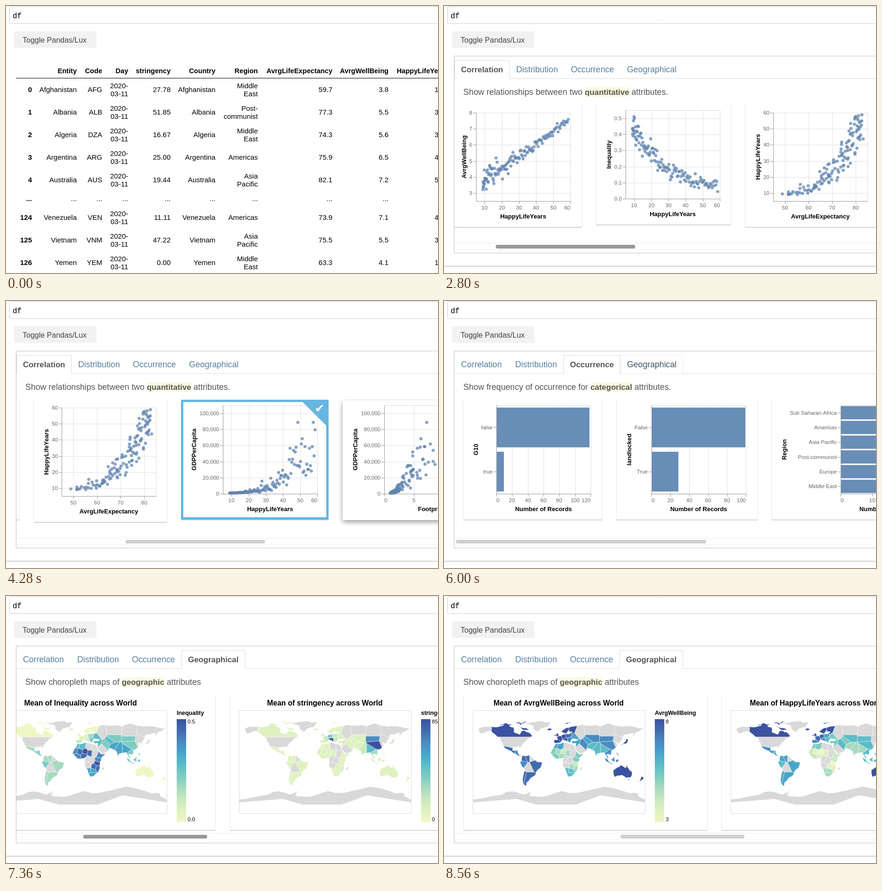
An HTML page with a canvas that plays this animation: 916 px wide and 568 px high, repeating every 8600 ms.

```html
<!DOCTYPE html>
<html>
<head>
<meta charset="utf-8">
<style>
html, body { margin: 0; width: 100%; height: 100%; overflow: hidden; background: #fff; }
canvas { display: block; }
</style>
</head>
<body>
<canvas id="stage" width="916" height="568"></canvas>
<script>
const ctx = document.getElementById('stage').getContext('2d');
const LOOP = 8600, VIEW = 1194, GAP = 31, PLOT_W = 200, PLOT_H = 188;
const SANS = '"Liberation Sans", Arial, sans-serif';
const MONO = '"Liberation Mono", monospace';
const BLUE = '#688db6', GRID = '#e2e2e2', AXIS = '#999';

// ---------- helpers ----------
const setFont = (size, bold, family = SANS) => { ctx.font = `${bold ? 'bold ' : ''}${size}px ${family}`; };
function measure(s, size, bold) {
  setFont(size, bold);
  return ctx.measureText(s).width;
}
function text(s, x, y, size, { align = 'left', bold = false, color = '#000', font = SANS } = {}) {
  setFont(size, bold, font);
  ctx.textAlign = align;
  ctx.fillStyle = color;
  ctx.fillText(s, x, y + size * 0.35);
}
function sideText(s, x, y, size) {
  ctx.save();
  ctx.translate(x, y);
  ctx.rotate(-Math.PI / 2);
  text(s, 0, 0, size, { align: 'center', bold: true });
  ctx.restore();
}
function rect(x, y, w, h, color) {
  ctx.fillStyle = color;
  ctx.fillRect(x, y, w, h);
}
function frame(x, y, w, h, color) {
  ctx.strokeStyle = color;
  ctx.lineWidth = 1;
  ctx.strokeRect(x + 0.5, y + 0.5, w, h);
}
const hline = (x, y, w, color) => rect(x, y, w, 1, color);
const vline = (x, y, h, color) => rect(x, y, 1, h, color);
const clamp = (v, lo, hi) => Math.min(hi, Math.max(lo, v));
const smooth = (t, a, b) => { const p = clamp((t - a) / (b - a), 0, 1); return p * p * (3 - 2 * p); };
const range = (a, b, step) => Array.from({ length: Math.round((b - a) / step) + 1 }, (_, i) => a + i * step);
const bell = (x, width) => Math.exp(-((x / width) ** 2));

let seed = 11;
function random() {
  seed = (seed * 1664525 + 1013904223) % 4294967296;
  return seed / 4294967296;
}
const noise = () => (random() + random() + random() - 1.5) * 2;

// ---------- scatter data ----------
const countries = range(0, 127, 1).map(i => {
  const happy = 9 + 50 * ((i + 0.5) / 128) ** 1.4;
  const decay = Math.exp(-(happy - 9) / 20);
  const gdp = Math.min(106000, 700 + Math.min(40000 * (happy / 50) ** 3.6, 50000) * Math.exp(noise() * 0.45));
  return {
    happy, gdp,
    life: clamp(84 - 30 * decay + noise() * (3 * decay + 1.5), 48.9, 83.6),
    being: 2.95 + 0.078 * happy + noise() * 0.42 * (1 - happy / 75),
    unequal: clamp(0.04 + 0.66 * Math.exp(-happy / 20) + noise() * (0.04 * decay + 0.015), 0.04, 0.51),
    foot: 0.6 + 0.68 * (gdp / 1000) ** 0.55 * Math.exp(noise() * 0.28)
  };
});

// ---------- charts ----------
const field = (title, domain, ticks, label = v => v.toLocaleString('en-US')) => ({ title, domain, ticks, label });
const fields = {
  life: field('AvrgLifeExpectancy', [45, 85], range(50, 80, 10)),
  being: field('AvrgWellBeing', [2.5, 8], range(3, 8, 1)),
  happy: field('HappyLifeYears', [5, 60], range(10, 60, 10)),
  unequal: field('Inequality', [0, 0.55], range(0, 0.5, 0.1), v => v.toFixed(1)),
  gdp: field('GDPPerCapita', [0, 110000], range(0, 100000, 20000)),
  foot: field('Footprint', [0, 16], range(0, 15, 5)),
  stringency: field('stringency', [0, 100], range(0, 100, 20))
};
const count = max => field('Number of Records', [0, max], range(0, max, max > 60 ? 20 : 10));
const scale = ([a, b], lo, hi) => v => lo + (v - a) / (b - a) * (hi - lo);
const LABEL = 11.5, labelColor = '#666';

function xAxis(f, left, top) {
  const X = scale(f.domain, left, left + PLOT_W), base = top + PLOT_H;
  for (const v of f.ticks) {
    const x = Math.round(X(v)), label = f.label(v), half = measure(label, LABEL) / 2;
    vline(x, top, PLOT_H, GRID);
    vline(x, base, 6, AXIS);
    text(label, clamp(x, left + half, left + PLOT_W - half), base + 14, LABEL, { align: 'center', color: labelColor });
  }
  text(f.title, left + PLOT_W / 2, base + 32, 13, { align: 'center', bold: true });
  return X;
}
function yTick(label, left, y) {
  hline(left - 6, Math.round(y), 6, AXIS);
  text(label, left - 8, y, LABEL, { align: 'right', color: labelColor });
}
// Places a plot in its card: the widest label sets the left margin.
function plotCard(xField, yTitle, labels, top, drawMarks) {
  const margin = 46 + Math.max(...labels.map(s => measure(s, LABEL)));
  return {
    width: Math.round(margin + PLOT_W + 23.5),
    bottom: top + 244,
    draw(x) {
      const left = Math.round(x + margin);
      const X = xAxis(xField, left, top);
      frame(left, top, PLOT_W, PLOT_H, '#ddd');
      sideText(yTitle, x + 26, top + PLOT_H / 2, 13);
      drawMarks(left, X);
      hline(left, top + PLOT_H, PLOT_W + 1, AXIS);
      vline(left, top, PLOT_H, AXIS);
    }
  };
}
function valueCard(xField, yField, drawMarks) {
  const top = yField.ticks.at(-1) === yField.domain[1] ? 227 : 222;
  const Y = scale(yField.domain, top + PLOT_H, top);
  return plotCard(xField, yField.title, yField.ticks.map(yField.label), top, (left, X) => {
    for (const v of yField.ticks) {
      hline(left, Math.round(Y(v)), PLOT_W, GRID);
      yTick(yField.label(v), left, Y(v));
    }
    drawMarks(left, X, Y);
  });
}
const scatter = (xKey, yKey) => valueCard(fields[xKey], fields[yKey], (left, X, Y) => {
  ctx.fillStyle = 'rgba(96,132,175,.75)';
  for (const c of countries) {
    ctx.beginPath();
    ctx.arc(X(c[xKey]), Y(c[yKey]), 3.3, 0, 7);
    ctx.fill();
  }
});
const histogram = (key, max, shape) => valueCard(fields[key], count(max), (left, X, Y) => {
  for (let i = 0; i < 10; i++) {
    const y = Y(max * shape((i + 0.5) / 10));
    rect(left + i * 20 + 1, y, 18, Y(0) - y, BLUE);
  }
});
function bars(title, max, names, value) {
  const band = PLOT_H / names.length;
  return plotCard(count(max), title, names, 222, (left, X) => names.forEach((name, i) => {
    const mid = 222 + band * (i + 0.5);
    rect(left, mid - band * 0.45, X(value(i)) - left, band * 0.9, BLUE);
    yTick(name, left, mid);
  }));
}

// ---------- maps ----------
const parse = s => s.split(',').map(p => p.trim().split(' ').map(Number));

// Roughens a coarse outline into a coast.
function coast(points, depth = 2) {
  if (!depth) return points;
  return coast(points.flatMap((p, i) => {
    const q = points[(i + 1) % points.length];
    const dx = q[0] - p[0], dy = q[1] - p[1], bend = noise() * 0.08;
    return [p, [(p[0] + q[0]) / 2 - dy * bend, (p[1] + q[1]) / 2 + dx * bend]];
  }), depth - 1);
}

// The part of the world nearer to one site than to any other.
function cell(site, sites) {
  const d2 = (p, s) => (p[0] - s[0]) ** 2 + (p[1] - s[1]) ** 2;
  let poly = [[-200, -95], [200, -95], [200, 95], [-200, 95]];
  for (const other of sites) {
    if (other === site) continue;
    const side = p => d2(p, site) - d2(p, other);
    poly = poly.flatMap((p, i) => {
      const q = poly[(i + 1) % poly.length], a = side(p), b = side(q), k = a / (a - b);
      const cut = a * b < 0 ? [[p[0] + k * (q[0] - p[0]), p[1] + k * (q[1] - p[1])]] : [];
      return a <= 0 ? [p, ...cut] : cut;
    });
  }
  return poly;
}
const toPath = rings => new Path2D(rings.map(ring => `M${ring.join(' ')}Z`).join(''));

// Outlines in degrees; sites are longitude, latitude, wealth (-1: no data).
const lands = [
  ['-168 66,-156 71,-128 70,-95 69,-94 59,-82 54,-77 62,-64 59,-56 52,-66 45,-75 36,-81 26,-84 30,-97 27,-97 20,-87 21,-83 10,-78 8,-95 15,-106 22,-117 32,-124 48,-140 60,-163 56;-90 80,-66 83,-80 75;-118 73,-102 72,-107 69;-86 73,-63 65,-74 64;-124 75,-98 76,-112 74',
    '-100 62 9,-100 36 -1,-104 18 6.5,-88 5 5,-182 64 -1'],
  ['-73 78,-35 83,-18 79,-24 70,-40 65,-44 60,-53 66,-57 75', '-40 70 -1'],
  ['-77 8,-62 10,-50 0,-35 -6,-39 -17,-48 -26,-58 -37,-66 -46,-69 -55,-75 -48,-71 -20,-81 -5',
    '-73 4 6,-66 7 6,-56 7 -1,-50 -10 6,-76 -9 5,-65 -17 -1,-74 -32 6,-65 -34 6'],
  ['-17 15,-6 35,10 37,32 31,43 12,51 12,40 -5,40 -16,33 -28,20 -35,12 -17,9 4,-8 4',
    '2 29 4,-8 31 4,-3 18 1,-11 20 2,10 17 0,18 15 1,18 27 -1,28 27 -1,29 14 -1,8 9 1,-8 8 2,40 9 2,37 0 2,22 -2 -1,13 4 -1,35 -7 0,17 -12 -1,27 -14 1,37 -16 1,17 -22 3,24 -23 3,24 -30 3'],
  ['-9 37,-9 43,-1 44,-4 48,8 54,22 55,29 60,22 61,24 66,13 56,5 60,15 68,27 71,68 73,104 78,140 72,180 69,163 60,157 51,155 59,136 54,127 35,121 39,122 30,109 20,109 11,100 13,104 2,94 17,80 14,78 8,72 21,57 26,59 21,45 13,35 29,36 36,27 37,29 41,41 42,30 46,23 37,13 45,17 39,8 44,-1 37',
    '-4 40 7,2 47 8,10 51 8,13 42 7,15 63 9,26 63 9,20 52 6,23 44 5,32 49 4,33 38 4,45 24 -1,54 33 5,62 40 4,67 29 3,78 21 3,96 21 3,102 13 5,104 34 5,125 43 -1,103 46 5,67 47 5,67 61 -1,42 57 -1,103 56 -1,132 58 -1'],
  ['-5 50,1 52,-3 58;-10 52,-6 55,-6 52;-24 65,-14 66,-19 63;12 79,26 80,17 77', '0 55 8.5'],
  ['130 32,136 36,141 45,145 43,140 35', '138 36 7'],
  ['95 5,106 -6,103 -1;106 -6,115 -8,108 -8;109 1,117 6,116 -4;119 1,125 1,121 -5;120 18,126 7,123 11', '115 0 5'],
  ['114 -22,130 -11,140 -17,142 -11,153 -25,150 -37,138 -35,130 -32,116 -35;173 -35,178 -38,168 -47;145 -41,148 -41,146 -43', '135 -25 9'],
  ['-180 -90,-180 -84,-120 -74,-75 -73,-58 -64,-62 -75,-35 -78,-10 -71,55 -66,135 -66,165 -71,167 -78,180 -84,180 -90;44 -17,50 -15,46 -25', '0 -80 -1']
].map(([outline, siteList]) => {
  const sites = parse(siteList);
  return {
    outline: toPath(outline.split(';').map(ring => coast(parse(ring)))),
    cells: sites.map(s => ({ lon: s[0], lat: s[1], wealth: s[2], path: toPath([cell(s, sites)]) }))
  };
});

const ramp = ['#eef7c4', '#dff1c1', '#c9e9bf', '#a6dbc0', '#7dccc2', '#5cbdc8', '#48a5ca', '#4a8bc1', '#436bb0', '#3b52a1'];
const near = (c, lon, lat, reach) => bell(Math.hypot(c.lon - lon, c.lat - lat), reach);
const shades = {
  GDPPerCapita: c => c.wealth ** 2 / 11,
  Inequality: c => 9.4 - c.wealth,
  stringency: c => 1 + 8 * Math.max(near(c, 105, 36, 20), near(c, 12, 43, 8)),
  AvrgWellBeing: c => c.wealth + 1.5,
  HappyLifeYears: c => c.wealth
};

function worldMap(title, max, min) {
  return {
    width: Math.round(429 + measure(title, 12.4, true)),
    bottom: 499,
    draw(x) {
      const left = x + 19, bar = left + 386;
      text(`Mean of ${title} across World`, left + 182, 228, 15.6, { align: 'center', bold: true });
      frame(left, 243, 365, 219, '#ddd');
      ctx.save();
      ctx.translate(left + 182.5, 349);
      ctx.scale(1.013, -1);
      ctx.strokeStyle = '#fff';
      ctx.lineWidth = 0.5;
      for (const { outline, cells } of lands) {
        ctx.save();
        ctx.clip(outline);
        for (const c of cells) {
          ctx.fillStyle = c.wealth < 0 ? '#d9d9d9' : ramp[Math.round(clamp(shades[title](c), 0, 9))];
          ctx.fill(c.path);
          ctx.stroke(c.path);
        }
        ctx.restore();
      }
      ctx.restore();
      const fill = ctx.createLinearGradient(0, 481, 0, 262);
      ramp.forEach((color, i) => fill.addColorStop(i / 9, color));
      text(title, bar, 249, 12.4, { bold: true });
      rect(bar, 262, 20, 219, fill);
      text(max, bar + 23, 267, LABEL);
      text(min, bar + 23, 475, LABEL);
    }
  };
}

// ---------- tabs ----------
const TAB = 17.7, TAB_BOLD = 16.75;
const tabs = [
  { name: 'Correlation', note: ['Show relationships between two ', 'quantitative', ' attributes.'], thumb: 296, cards: [
    scatter('life', 'unequal'), scatter('happy', 'being'), scatter('happy', 'unequal'),
    scatter('life', 'happy'), scatter('happy', 'gdp'), scatter('foot', 'gdp')] },
  { name: 'Distribution', note: ['Show univariate distributions of ', 'quantitative', ' attributes.'], thumb: 340, cards: [
    histogram('gdp', 80, u => 0.95 * Math.exp(-u * 5)),
    histogram('stringency', 40, u => 0.9 * bell(u - 0.2, 0.28)),
    histogram('unequal', 30, u => 0.9 * bell(u - 0.4, 0.4))] },
  { name: 'Occurrence', note: ['Show frequency of occurrence for ', 'categorical', ' attributes.'], thumb: 531, cards: [
    bars('G10', 120, ['false', 'true'], i => i ? 9.6 : 118.5),
    bars('landlocked', 100, ['False', 'True'], i => i ? 28.5 : 99.5),
    bars('Region', 30, ['Sub Saharan Africa', 'Americas', 'Asia Pacific', 'Post-communist', 'Europe', 'Middle East'], i => 28 - 2.5 * i)] },
  { name: 'Geographical', note: ['Show choropleth maps of ', 'geographic', ' attributes'], thumb: 263, cards: [
    worldMap('GDPPerCapita', '100,000', '0'), worldMap('Inequality', '0.5', '0.0'), worldMap('stringency', '85', '0'),
    worldMap('AvrgWellBeing', '8', '3'), worldMap('HappyLifeYears', '60', '9')] }
];
for (const { cards } of tabs) {
  let left = 41;
  for (const card of cards) {
    card.left = left;
    left += card.width + GAP;
  }
}

function drawCard({ left, width, bottom, draw }, scroll, hovered, selected) {
  const x = Math.round(left - scroll);
  if (x > 916 || x + width < 22) return;
  if (hovered) {
    ctx.save();
    ctx.shadowColor = 'rgba(0,0,0,.4)';
    ctx.shadowBlur = 10;
    ctx.shadowOffsetY = 4;
    rect(x, 211, width, bottom - 211, '#fff');
    ctx.restore();
  } else {
    vline(x - 1, 211, bottom - 211, '#e8e8e8');
    vline(x + width, 211, bottom - 211, '#e8e8e8');
    hline(x, bottom - 1, width, '#c8c8c8');
    hline(x, bottom, width, '#e4e4e4');
  }
  draw(x);
  if (!selected) return;
  const right = x + width - 4;
  ctx.strokeStyle = ctx.fillStyle = '#66b6e2';
  ctx.lineWidth = 5;
  ctx.strokeRect(x + 1.5, 212.5, width - 3, 250);
  ctx.beginPath();
  ctx.moveTo(right - 52, 213);
  ctx.lineTo(right, 213);
  ctx.lineTo(right, 265);
  ctx.fill();
  text('✔', right - 14, 228, 25, { align: 'center', color: '#fff', font: '"DejaVu Sans", sans-serif' });
}

function drawTabs(active, hover) {
  hline(22, 154, 894, '#ddd');
  let x = 36;
  tabs.forEach(({ name }, i) => {
    const on = i === active, size = on ? TAB_BOLD : TAB;
    const width = Math.round(measure(name, size, on));
    if (on) {
      rect(x - 13, 115, width + 26, 41, '#fff');
      ctx.strokeStyle = '#ddd';
      ctx.lineWidth = 1;
      ctx.beginPath();
      ctx.moveTo(x - 13.5, 155);
      ctx.lineTo(x - 13.5, 115.5);
      ctx.lineTo(x + width + 13.5, 115.5);
      ctx.lineTo(x + width + 13.5, 155);
      ctx.stroke();
    } else if (i === hover) {
      frame(x - 13, 115, width + 26, 39, '#eee');
    }
    text(name, x, 135, size, { bold: on, color: on ? '#555' : i === hover ? '#3d566b' : '#557f9f' });
    x += width + 28;
  });
}

function drawNote([before, key, after]) {
  const color = '#555';
  const keyX = 41 + measure(before, TAB), keyWidth = measure(key, TAB_BOLD, true);
  text(before, 41, 183, TAB, { color });
  rect(keyX, 173, keyWidth, 20, '#fbfbe0');
  text(key, keyX, 183, TAB_BOLD, { bold: true, color });
  text(after, keyX + keyWidth, 183, TAB, { color });
}

function drawLux(t) {
  const active = t < 4820 ? 0 : t < 5560 ? 1 : t < 6280 ? 2 : 3;
  const hover = active === 2 && t > 5880 ? 3 : -1;
  const scroll = active === 0 ? 921 * smooth(t, 2140, 3742) : active === 3 ? 1585 * smooth(t, 6800, 8102) : 0;
  const dragging = t > 2140 && t < 3820 || t > 6760 && t < 8280;
  const { note, thumb, cards } = tabs[active];

  frame(21, 106, 920, 419, '#c4c4c4');
  hline(0, 553, 916, '#aaa');
  drawTabs(active, hover);
  drawNote(note);

  ctx.save();
  ctx.beginPath();
  ctx.rect(22, 209, 894, 294);
  ctx.clip();
  cards.forEach((card, i) => {
    const picked = active === 0 && (i === 4 && t > 4000 || i === 5 && t > 4480);
    const hovered = active === 0 && i === 5 && t > 4200;
    drawCard(card, scroll, hovered, picked);
  });
  ctx.restore();

  hline(22, 504, 894, '#ececec');
  hline(22, 518, 894, '#f0f0f0');
  ctx.fillStyle = dragging ? '#999' : '#d0d0d0';
  ctx.beginPath();
  ctx.roundRect(25 + scroll * thumb / VIEW, 508, thumb, 8, 4);
  ctx.fill();
}

// ---------- table ----------
const columns = [['', 55], ['Entity', 150], ['Code', 204], ['Day', 259], ['stringency', 349], ['Country', 444],
  ['Region', 534], ['AvrgLifeExpectancy', 692], ['AvrgWellBeing', 811], ['HappyLifeYears', 938]];
const rows = [
  '0|Afghanistan|AFG|27.78|Middle/East|59.7|3.8|12.4',
  '1|Albania|ALB|51.85|Post-/communist|77.3|5.5|34.4',
  '2|Algeria|DZA|16.67|Middle/East|74.3|5.6|30.5',
  '3|Argentina|ARG|25.00|Americas|75.9|6.5|40.2',
  '4|Australia|AUS|19.44|Asia/Pacific|82.1|7.2|53.1',
  '...|...|...|...|...|...|...|',
  '124|Venezuela|VEN|11.11|Americas|73.9|7.1|41.5',
  '125|Vietnam|VNM|47.22|Asia/Pacific|75.5|5.5|32.8',
  '126|Yemen|YEM|0.00|Middle/East|63.3|4.1|15.2'
].map(line => line.split('|'));

function drawTable() {
  for (const [title, edge] of columns) text(title, edge, 138, 14.6, { align: 'right', bold: true });
  hline(21, 153, 895, '#000');
  let top = 154;
  for (const [index, name, code, stringency, region, ...numbers] of rows) {
    const gap = index === '...', height = gap ? 32 : 48;
    const day = gap ? '...' : '2020-/03-11';
    [index, name, code, day, stringency, name, region, ...numbers].forEach((entry, col) => {
      const lines = entry.split('/');
      lines.forEach((line, k) => text(line, columns[col][1], top + height / 2 + (k - (lines.length - 1) / 2) * 17,
        15, { align: 'right', bold: col === 0 }));
    });
    top += height;
  }
}

// ---------- page ----------
function draw(t) {
  rect(0, 0, 916, 568, '#fff');
  ctx.strokeStyle = '#cfcfcf';
  ctx.lineWidth = 1;
  ctx.beginPath();
  ctx.roundRect(7.5, 1.5, 930, 36, 2);
  ctx.stroke();
  text('df', 14, 20, 16, { font: MONO });

  const focused = t > 640 && t < 1880;
  rect(17, 54, 175, 35, focused ? '#f0f0f0' : '#f2f2f2');
  if (focused) frame(16, 53, 176, 37, '#86b0d6');
  text('Toggle Pandas/Lux', 35, 72, 16, { color: '#444' });

  if (t < 1240) drawTable();
  else drawLux(t);
}

const start = performance.now();
function tick() {
  draw((performance.now() - start) % LOOP);
  requestAnimationFrame(tick);
}
tick();
</script>
</body>
</html>
```
